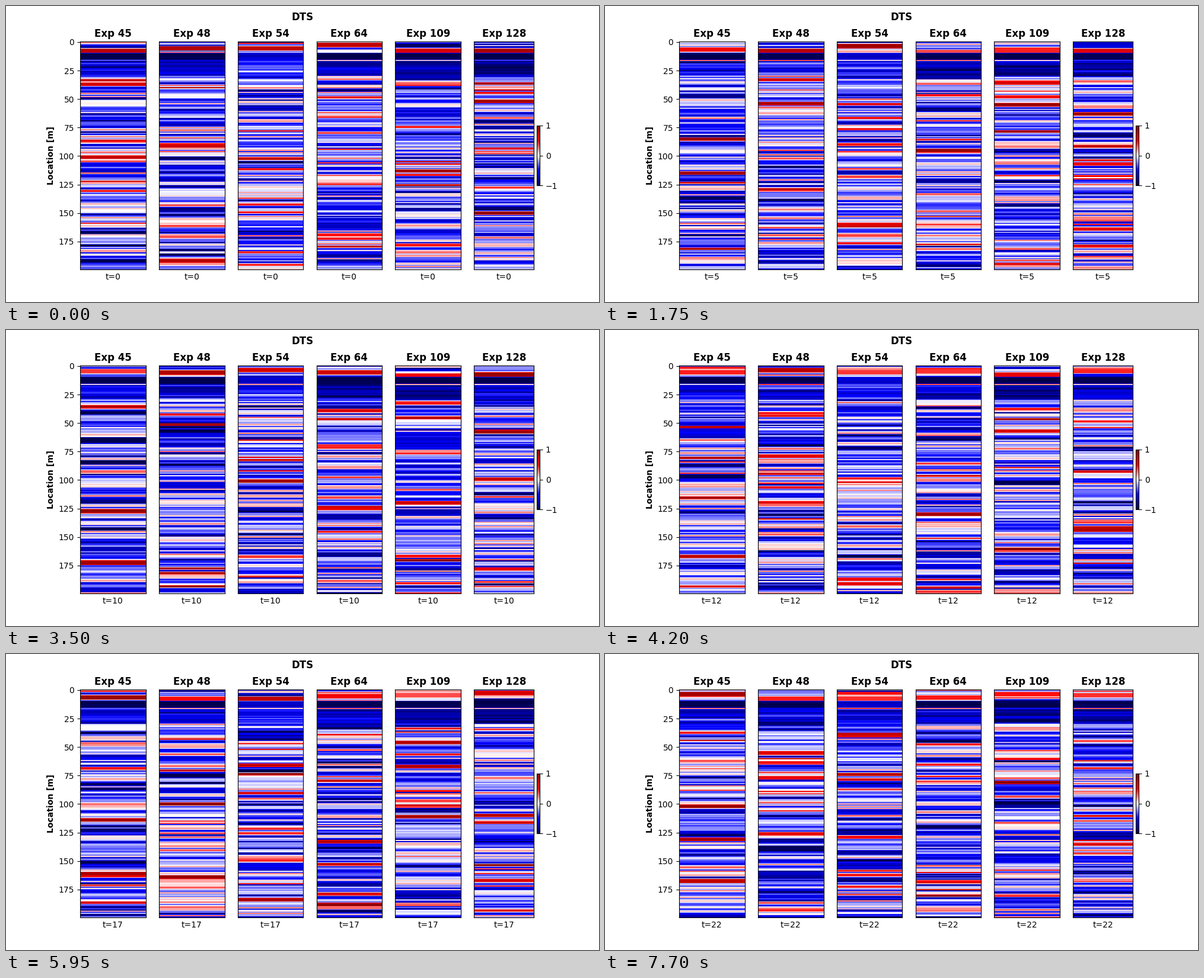
Write a matplotlib script that moves like this. It is 1000x500 px and loops after 8000 ms.

```python
import numpy as np
import matplotlib.pyplot as plt
from matplotlib.animation import FuncAnimation

TICK_MS = 50
TICKS_PER_STEP = 7
TICKS = 160
STEPS = 23
ROWS = 200

# panel title, level of the cold core (rows 10 to 15), level of the stretch below
PANELS = [
    ("Exp 45", -1.0, -0.6),
    ("Exp 48", -1.0, -0.6),
    ("Exp 54", -0.65, -0.45),
    ("Exp 64", -1.0, -0.7),
    ("Exp 109", -1.0, -0.8),
    ("Exp 128", -1.0, -0.72),
]


def layers(rng, n, mean, spread, cut):
    """Random levels held over short runs of rows, with a little jitter."""
    run = np.cumsum(rng.random(n) < cut)
    return rng.normal(mean, spread, n + 1)[run] + rng.normal(0, 0.08, n)


def profile(rng, core, tail):
    """Values along the fibre for one panel at one step."""
    v = layers(rng, ROWS, -0.27, 0.38, 0.75)

    # a few strong warm bands
    for row in rng.integers(32, ROWS - 3, 4):
        v[row:row + rng.integers(1, 4)] = rng.uniform(0.5, 0.95)

    # warm band above the cold core, cooler stretch below it
    head = rng.integers(1, 8)
    v[head:min(head + 4, 10)] = rng.uniform(0.3, 0.9)
    v[10:16] = core + rng.normal(0, 0.03, 6)
    if rng.random() < 0.6:
        v[16] = rng.uniform(0.1, 0.8)
    v[17:30] = layers(rng, 13, tail, 0.15, 0.6)
    return np.clip(v, -1, 1)[:, None]


rng = np.random.default_rng(12)
data = [[profile(rng, core, tail) for _, core, tail in PANELS]
        for _ in range(STEPS)]

fig, axes = plt.subplots(1, len(PANELS), figsize=(10, 5), dpi=100)
fig.subplots_adjust(left=0.125, right=0.9, bottom=0.11, top=0.88, wspace=0.2)
fig.suptitle("DTS", fontsize=12, fontweight="bold")

images = []
for ax, (name, _, _), column in zip(axes, PANELS, data[0]):
    images.append(ax.imshow(column, cmap="seismic", vmin=-1, vmax=1,
                            aspect="auto"))
    ax.set_title(name, fontsize=12, fontweight="bold")
    ax.set_xticks([])
    ax.set_yticks([])
axes[0].set_yticks(range(0, ROWS, 25))
axes[0].set_ylabel("Location [m]", fontweight="bold")
fig.colorbar(images[-1], ax=axes[-1], fraction=0.046, pad=0.04,
             ticks=[-1, 0, 1])


def update(tick):
    step = min(tick // TICKS_PER_STEP, STEPS - 1)
    for ax, im, column in zip(axes, images, data[step]):
        im.set_data(column)
        ax.set_xlabel(f"t={step}")
    return images


anim = FuncAnimation(fig, update, frames=TICKS, interval=TICK_MS,
                     init_func=lambda: update(0), repeat=True, repeat_delay=0)
plt.show()
```
